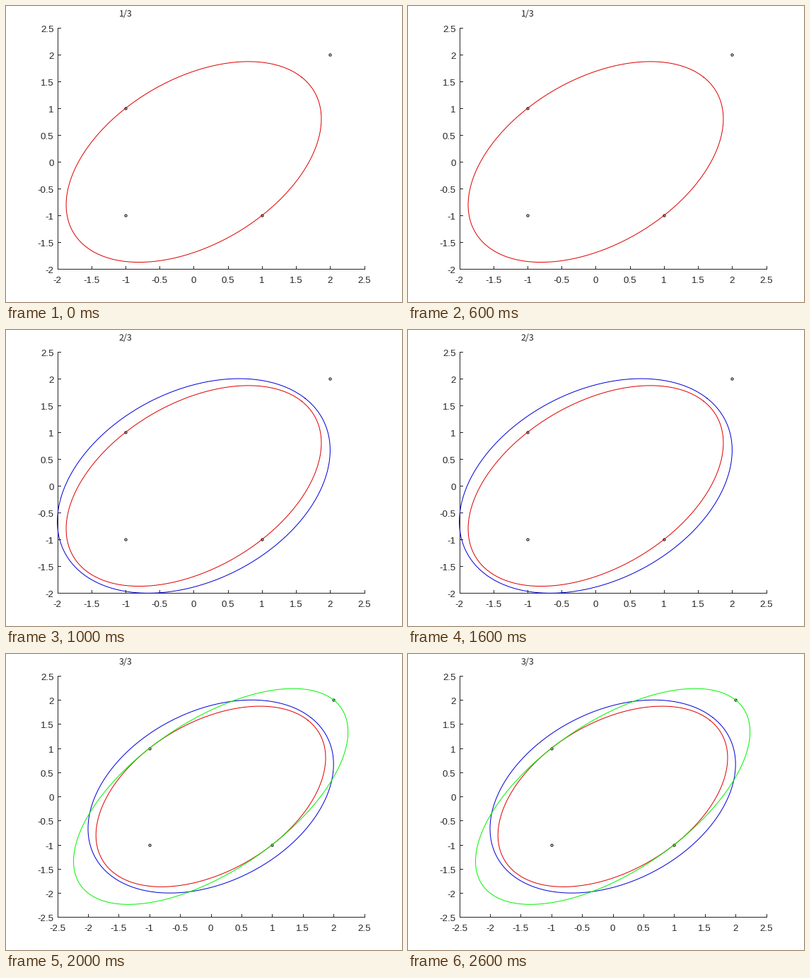
A matplotlib script that plays this animation: 560x420 px, repeating every 3 s.

```python
import matplotlib.pyplot as plt
import numpy as np
from matplotlib.animation import FuncAnimation

W, H, DPI = 560, 420, 100
PX = 72 / DPI  # one pixel in points
LEFT, RIGHT, TOP, BOTTOM = 72.6, 506.6, 31, 373.4
HIGH = 2.5
DARK = "0.15"

POINTS = np.array([(2, 2), (-1, -1), (1, -1), (-1, 1)])
# colour, squared semi-axes along the rising and falling diagonals
ELLIPSES = [("#e00000", 5, 2), ("#0000d8", 16 / 3, 8 / 3), ("#00f400", 8, 2)]
LOWS = [-2, -2, -2.5]

fig = plt.figure(figsize=(W / DPI, H / DPI), dpi=DPI, facecolor="white")
ax = fig.add_axes([0, 0, 1, 1])


def to_px(x, y, low):
    span = HIGH - low
    return (LEFT + (x - low) / span * (RIGHT - LEFT),
            BOTTOM - (y - low) / span * (BOTTOM - TOP))


def line(xs, ys, color):
    ax.plot(xs, ys, color=color, lw=PX)


def label(x, y, text, ha, size=13.33, font="Liberation Sans"):
    ax.text(x, y, text, ha=ha, va="baseline", fontsize=size * PX,
            family=font, color=DARK)


def draw_axes(low):
    line([LEFT, LEFT, RIGHT], [TOP, BOTTOM, BOTTOM], DARK)
    for value in np.arange(low, HIGH + 0.1, 0.5):
        x, y = to_px(value, value, low)
        line([x, x], [BOTTOM, BOTTOM - 4], DARK)
        line([LEFT, LEFT + 4], [y, y], DARK)
        label(x, 393, f"{value:g}", "center")
        label(67.6, y + 5.9, f"{value:g}", "right")


def draw_ellipse(color, rising, falling, low):
    t = np.linspace(0, 2 * np.pi, 361)
    u = np.sqrt(rising / 2) * np.cos(t)
    v = np.sqrt(falling / 2) * np.sin(t)
    line(*to_px(u + v, u - v, low), color)


def draw(i):
    ax.clear()
    ax.set(xlim=(0, W), ylim=(H, 0))
    ax.axis("off")
    low = LOWS[i]
    draw_axes(low)
    ax.plot(*to_px(POINTS[:, 0], POINTS[:, 1], low), "o", ms=3.2 * PX,
            mfc="none", mec="black", mew=PX)
    for ellipse in ELLIPSES[:i + 1]:
        draw_ellipse(*ellipse, low)
    label(160, 15, f"{i + 1}/{len(ELLIPSES)}", "left", 12.6, "Noto Sans CJK JP")


anim = FuncAnimation(fig, draw, frames=len(ELLIPSES), interval=1000,
                     init_func=lambda: None, repeat=True, repeat_delay=0)
plt.show()
```
